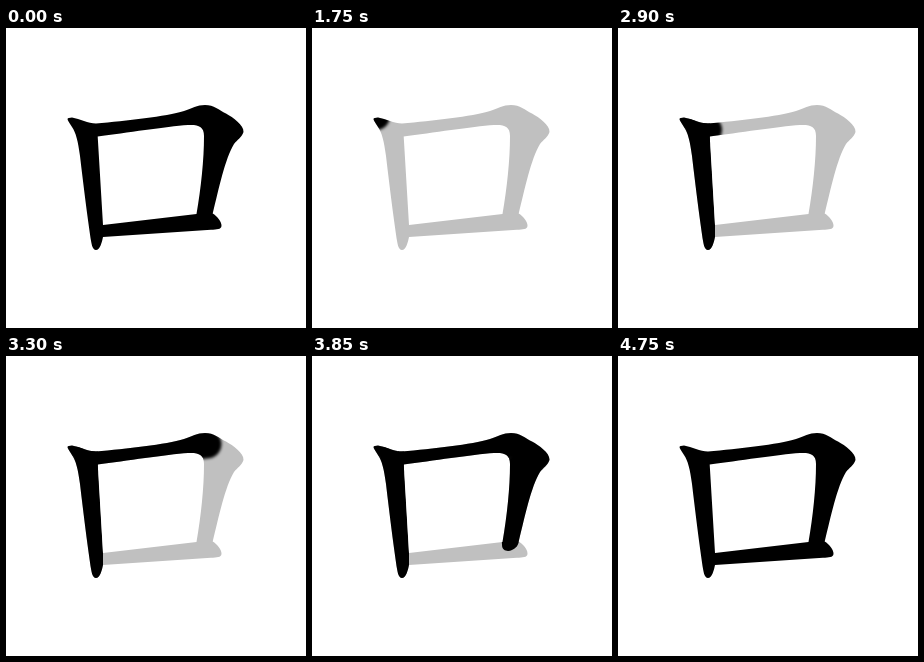
Write an HTML page that moves like this. It is 300 px wide and 300 px high and loops after 5.75 s.

```html
<!DOCTYPE html>
<html lang="en">
<head>
<meta charset="utf-8">
<title>Stroke order</title>
<style>
  html, body { margin: 0; width: 100%; height: 100%; overflow: hidden; background: #fff; }
  svg { display: block; width: 100vw; height: 100vh; }
  .sweep { fill: none; stroke: #000; stroke-width: 28; stroke-linecap: round; stroke-linejoin: round; filter: url(#soft); }
  .wide { stroke-width: 40; }
</style>
</head>
<body>
<svg viewBox="0 0 300 300">
  <defs>
    <path id="shape" clip-rule="evenodd" fill-rule="evenodd" d="
      M61.5 91Q62 89.5 66 89.5C74 91 82 95.3 90 95.5C120 92.7 160 88.5 178 83
      C186 80.5 191 77 199 77C208 77 213 82 220 85.5C227 89.5 238 97 237.5 104
      C236 109 231 112 228 116C219 131 213 160 206.7 185.5C211 188 216 194 215.5 198
      C215 201.5 211 201.5 205 201.7L97 209C96 214 94 222 90 222
      C86 222 85.5 215 84.5 210C81 186 77.5 158 74 128C72 113 70 105 66 99
      C63.5 95 61.5 92.5 61.5 91Z
      M91.7 108.5C120 105 160 98.5 182 97C192 96.5 198 98 198 108
      C198 132 195 160 190.5 186L97 197Z"/>
    <clipPath id="glyph"><use href="#shape"/></clipPath>
    <clipPath id="left"><path d="M55 85H92V108L97 197V225H60Z"/></clipPath>
    <clipPath id="hook"><path d="M86 70H245V185H207C206 190 204 192 200 194C196 196 190 195 190 189L186 120H86Z"/></clipPath>
    <clipPath id="base"><path d="M94 180H220V212H94Z"/></clipPath>
    <filter id="soft" filterUnits="userSpaceOnUse" x="0" y="0" width="300" height="300">
      <feGaussianBlur stdDeviation="1.8"/>
    </filter>
  </defs>
  <use id="ink" href="#shape"/>
  <!-- Brush paths: data-start is when the tip lands, data-moves how many steps follow. -->
  <g id="brush" clip-path="url(#glyph)">
    <g clip-path="url(#left)">
      <path class="sweep" data-start="1750" data-moves="1" d="M64 88h.1"/>
      <path class="sweep" data-start="1900" data-moves="5" d="M80 101L81 122L90 212"/>
    </g>
    <g clip-path="url(#hook)">
      <path class="sweep" data-start="2900" data-moves="5" d="M90 102L204 88L226 101"/>
      <path class="sweep wide" data-start="3550" data-moves="3" d="M211 115Q203 145 199 185"/>
    </g>
    <g clip-path="url(#base)">
      <path class="sweep" data-start="4350" data-moves="3" d="M100 204L203 193"/>
    </g>
  </g>
</svg>
<script>
const LOOP = 5750, FADE = 1000, DONE = 4750, STEP = 100;

const ink = document.getElementById('ink');
const brush = document.getElementById('brush');
const sweeps = [...document.querySelectorAll('.sweep')].map(path => ({
  path,
  start: +path.dataset.start,
  moves: +path.dataset.moves,
  length: path.getTotalLength()
}));

const show = (el, on) => el.setAttribute('display', on ? 'inline' : 'none');

function draw(t) {
  const whole = t < FADE || t >= DONE;
  ink.setAttribute('fill', whole ? '#000' : '#c0c0c0');
  show(brush, !whole);
  for (const { path, start, moves, length } of sweeps) {
    const moved = Math.max(0, Math.floor((t - start) / STEP));
    const drawn = length * Math.min(1, moved / moves);
    show(path, t >= start);
    path.setAttribute('stroke-dasharray', `${Math.max(drawn, 0.05)} 999`);
  }
}

const begin = performance.now();
function tick() {
  draw((performance.now() - begin) % LOOP);
  requestAnimationFrame(tick);
}
tick();
</script>
</body>
</html>
```
